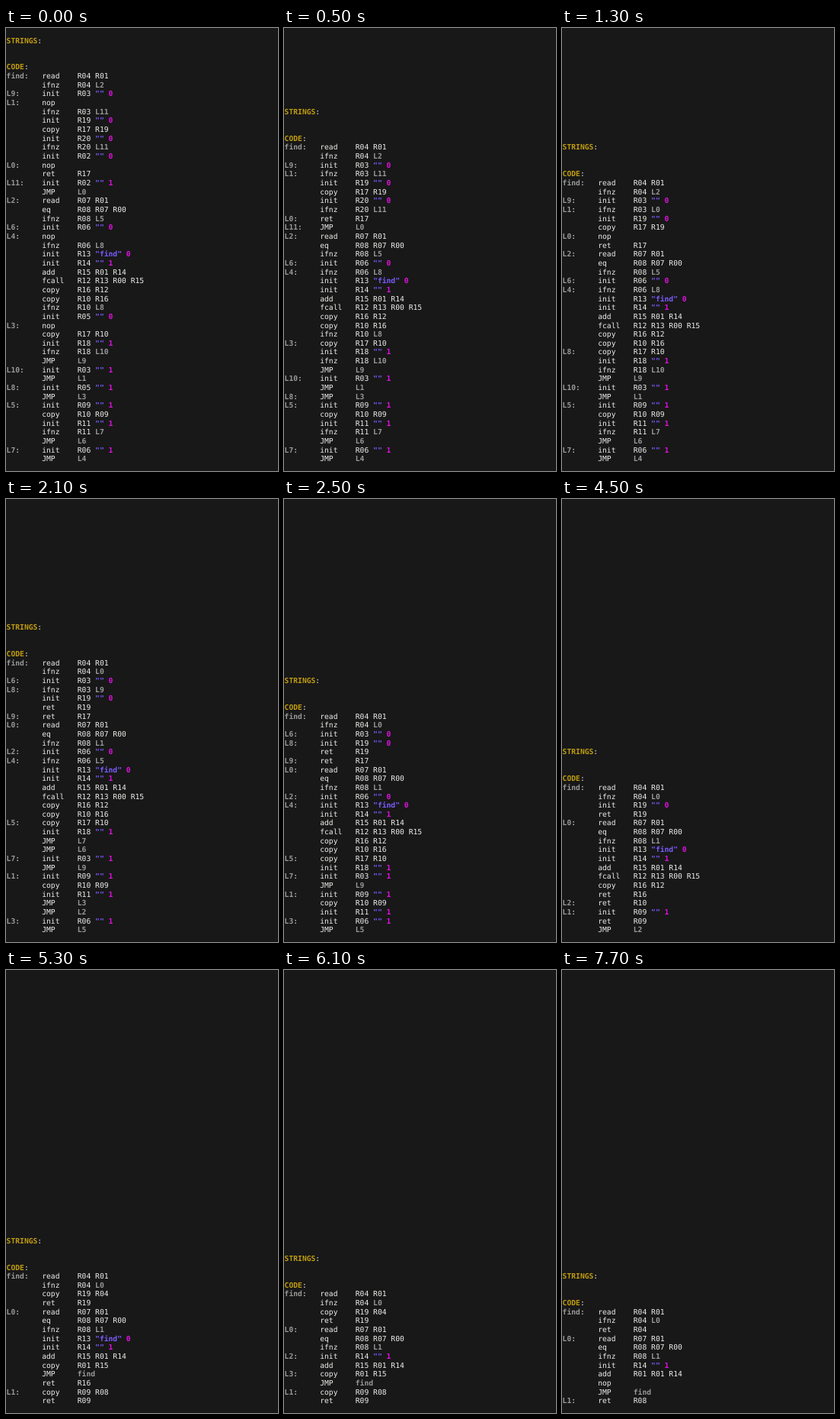
Write an HTML page that moves like this. It is 357 px wide and 580 px high and loops after 8 s.

```html
<!DOCTYPE html>
<html lang="en">
<head>
<meta charset="utf-8">
<title>Optimizer passes</title>
<style>
html, body { margin: 0; width: 100%; height: 100%; overflow: hidden; background: #181818; }
pre {
  position: absolute; left: .6px; bottom: 9px; margin: 0;
  font: 9.69px/11.66px "DejaVu Sans Mono", monospace;
  text-rendering: geometricPrecision; color: #eeeeec;
}
b { color: #999; }
b.head { color: #c09c10; }
b.str { color: #7a5cff; }
b.num { color: #e010e0; }
</style>
</head>
<body>
<pre id="screen"></pre>
<script>
const program = `find: read R04 R01
ifnz R04 L2
L9: init R03 "" 0
L1: nop
ifnz R03 L11
init R19 "" 0
copy R17 R19
init R20 "" 0
ifnz R20 L11
init R02 "" 0
L0: nop
ret R17
L11: init R02 "" 1
JMP L0
L2: read R07 R01
eq R08 R07 R00
ifnz R08 L5
L6: init R06 "" 0
L4: nop
ifnz R06 L8
init R13 "find" 0
init R14 "" 1
add R15 R01 R14
fcall R12 R13 R00 R15
copy R16 R12
copy R10 R16
ifnz R10 L8
init R05 "" 0
L3: nop
copy R17 R10
init R18 "" 1
ifnz R18 L10
JMP L9
L10: init R03 "" 1
JMP L1
L8: init R05 "" 1
JMP L3
L5: init R09 "" 1
copy R10 R09
init R11 "" 1
ifnz R11 L7
JMP L6
L7: init R06 "" 1
JMP L4`;

// One pass per line: "code" deletes, "a > b / c" replaces, "L1=L2" renames a label.
const passes = `nop; init R02 "" 0; init R02 "" 1; init R05 "" 0; init R05 "" 1
JMP L0; JMP L3; L11=L0; L3=L8
init R20 "" 0; ifnz R20 L0; ifnz R10 L8; ret R17 > nop / ret R17
nop; JMP L1 > JMP L0; JMP L4 > JMP L8
copy R17 R19 > ret R19; ifnz R18 L10 > JMP L10; ifnz R11 L7 > JMP L7; L2=L0; L9=L6; L1=L8; L0=L9; L5=L1; L6=L2; L8=L5; L10=L7; L7=L3
ifnz R03 L9; ifnz R06 L5; JMP L7; JMP L6; JMP L3; JMP L2
init R18 "" 1; init R11 "" 1; init R03 "" 0; init R06 "" 0; init R03 "" 1 > nop; init R06 "" 1 > nop
nop; L8=L0; L9=L6; L0=L1; L1=L3; L4=L2; L5=L4; L7=; L3=
JMP L6 > ret R17
ret R17; copy R17 R10 > ret R10 / ret R17; L0=; L2=; L1=L0; L3=L1; L4=L2
ret R17; copy R10 R16 > ret R16; copy R10 R09 > ret R09
ret R10; JMP L2; copy R16 R12 > ret R12
fcall R12 R13 R00 R15 > copy R01 R15; ret R12 > JMP find; init R19 "" 0 > copy R19 R04; init R09 "" 1 > copy R09 R08
init R13 "find" 0 > L2: init R13 "find" 0; copy R01 R15 > L3: copy R01 R15
init R13 "find" 0; ret R16
L2=; L3=
copy R19 R04 > ret R04; copy R09 R08 > ret R08
ret R19; ret R09
add R15 R01 R14 > add R01 R01 R14; copy R01 R15 > nop`;

function parse(text) {
  const [, label = '', code] = text.match(/^(?:(\w+): )?(.*)$/);
  return { label, code };
}

function edit(lines, from, to) {
  const out = [];
  let carried = '';   // a deleted line hands its label to the next one
  for (const line of lines) {
    const label = line.label || carried;
    carried = '';
    if (line.code !== from) out.push({ label, code: line.code });
    else if (!to) carried = label;
    else to.split(' / ').map(parse).forEach((added, i) =>
      out.push(i ? added : { label: added.label || label, code: added.code }));
  }
  return out;
}

function run(lines, pass) {
  const names = {};
  for (const item of pass.split('; ')) {
    if (item.includes('=')) {
      const [a, b] = item.split('=');
      names[a] = b;
    } else {
      lines = edit(lines, ...item.split(' > '));
    }
  }
  const rename = s => s.replace(/\bL\d+\b/g, name => names[name] ?? name);
  return lines.map(({ label, code }) => ({ label: rename(label), code: rename(code) }));
}

const bold = (text, kind = '') => `<b class="${kind}">${text}</b>`;

function colour(args) {
  return args.replace(/"\w*"|\b(?:L\d+|find|\d)\b/g, word =>
    bold(word, word[0] === '"' ? 'str' : /^\d/.test(word) ? 'num' : ''));
}

function show({ label, code }) {
  const [op, ...args] = code.split(' ');
  const head = label ? bold(label) + ':' + ' '.repeat(7 - label.length) : ' '.repeat(8);
  return head + op.padEnd(8) + colour(args.join(' '));
}

const states = [program.split('\n').map(parse)];
for (const pass of passes.split('\n')) states.push(run(states[states.length - 1], pass));

const title = bold('STRINGS', 'head') + ':\n\n\n' + bold('CODE', 'head') + ':\n';
const pages = states.map(lines => title + lines.map(show).join('\n'));

const screen = document.getElementById('screen');
let current = -1;

function frame() {
  const t = performance.now() % 8000;
  const index = Math.max(0, Math.floor((t - 100) / 400));   // the first page stays 500 ms
  if (index !== current) screen.innerHTML = pages[current = index];
  requestAnimationFrame(frame);
}
frame();
</script>
</body>
</html>
```
